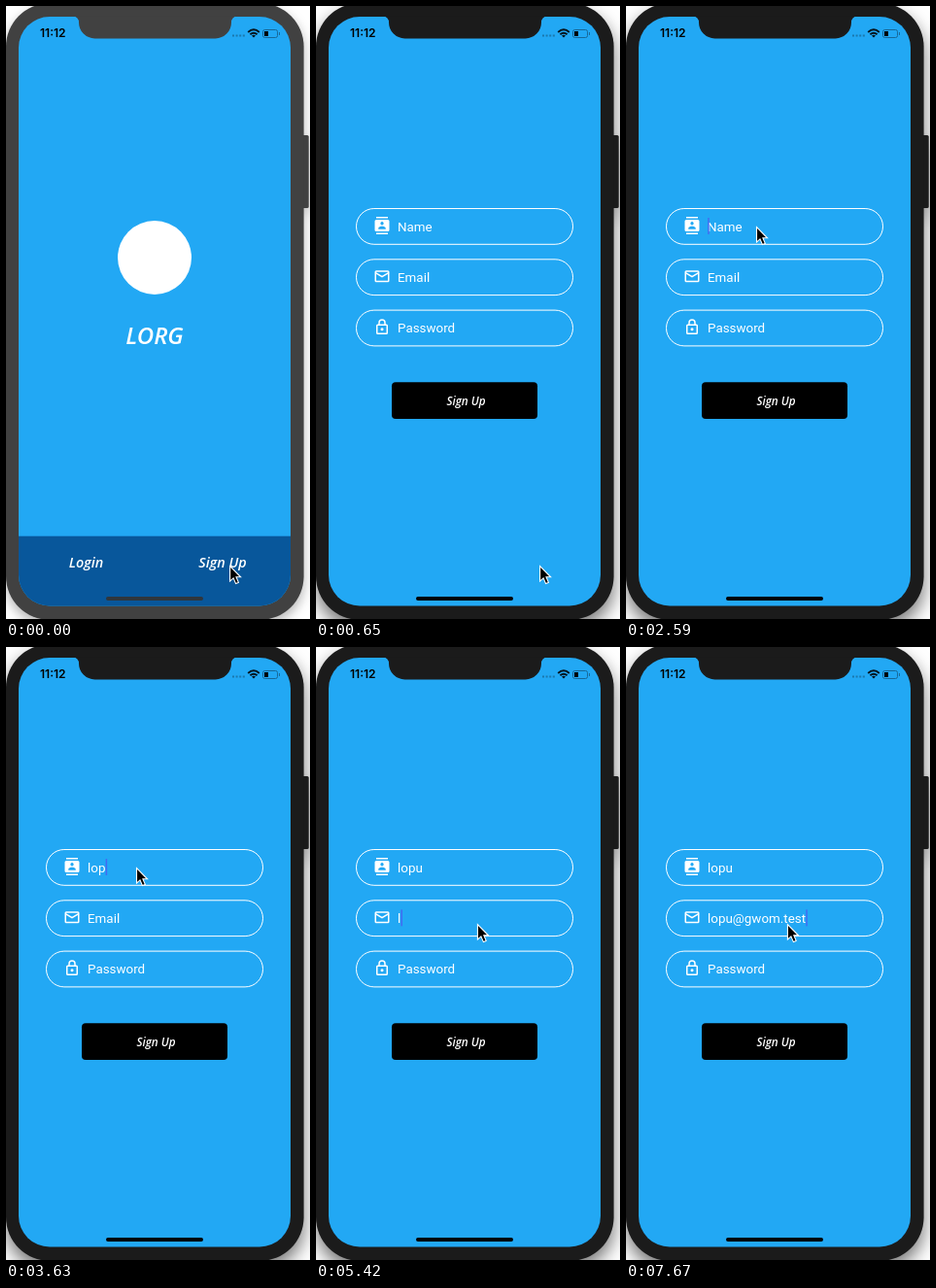
These frames come from a looping animation (313x631 px, 8000 ms). An HTML page:

```html
<!DOCTYPE html>
<html lang="en">
<head>
<meta charset="utf-8">
<title>Sign up</title>
<style>
  html, body { margin: 0; width: 100%; height: 100%; overflow: hidden; background: #fff; }
  svg { display: block; width: 313px; height: 631px; }
  .slant { font: italic 600 14.4px "Open Sans", sans-serif; fill: #fff; text-anchor: middle; }
  .field text { font: 13.4px Roboto, sans-serif; fill: #fff; }
  .clock { font: 600 12px Inter, sans-serif; }
  .pill { fill: none; stroke: #fff; }
  .line { fill: none; stroke: #fff; stroke-width: 2; }
</style>
</head>
<body>
<svg viewBox="0 0 313 631">
  <defs>
    <clipPath id="screen"><rect x="13" y="11" width="280" height="606.5" rx="32"/></clipPath>
    <rect id="pill" class="pill" x="41.5" y="208.5" width="223" height="36.8" rx="18.4"/>
  </defs>
  <g id="body">
    <rect x="300" y="133" width="11.7" height="75" rx="1.5"/>
    <rect x="0" y="-3" width="306.6" height="635" rx="45"/>
  </g>

  <g clip-path="url(#screen)">
    <rect width="313" height="631" fill="#22a8f4"/>
    <g id="welcome">
      <circle cx="153" cy="259" r="38" fill="#fff"/>
      <text class="slant" x="153" y="348" style="font-size:24px">LORG</text>
      <rect y="545.7" width="313" height="80" fill="#08579b"/>
      <text class="slant" x="82.5" y="578">Login</text>
      <text class="slant" x="223" y="578">Sign Up</text>
    </g>

    <g id="form">
      <g class="field">
        <use href="#pill"/>
        <path transform="translate(59 217) scale(.75)" fill="#fff" fill-rule="evenodd" d="M4 0h16v2H4zM4 22h16v2H4zM4 4h16q2 0 2 2v12q0 2-2 2H4q-2 0-2-2V6q0-2 2-2zm8 2.75a2.25 2.25 0 1 0 .01 0zM7 17h10v-1.5c0-1.67-3.33-2.5-5-2.5s-5 .83-5 2.5z"/>
        <text id="name" x="84" y="231.5"></text>
      </g>
      <g class="field">
        <use href="#pill"/>
        <g class="line" transform="translate(59 217) scale(.75)">
          <rect x="3" y="5" width="18" height="14" rx="1"/>
          <path d="M3 7l9 5.5L21 7"/>
        </g>
        <text id="email" x="84" y="231.5"></text>
      </g>
      <g class="field">
        <use href="#pill"/>
        <g class="line" transform="translate(59 217) scale(.75)">
          <rect x="5" y="9" width="14" height="12" rx="1"/>
          <path d="M8 9V6a4 4 0 0 1 8 0v3"/>
          <circle cx="12" cy="15" r="2" fill="#fff" stroke="none"/>
        </g>
        <text x="84" y="231.5">Password</text>
      </g>
      <rect id="caret" width="1.5" height="17" fill="#426bf2"/>
      <rect x="78" y="387.3" width="150" height="37.7" rx="4"/>
      <text class="slant" x="154.5" y="411" style="font-size:11.7px">Sign Up</text>
    </g>
  </g>

  <path id="notch" d="M69 10.5A6 6 0 0 1 75 17A16.4 16.4 0 0 0 91.4 33.4H215.6A16.4 16.4 0 0 0 232 17A6 6 0 0 1 238 10.5Z"/>
  <text class="clock" x="35" y="32">11:12</text>
  <path d="M233 30.5h13" stroke="#1b78ad" stroke-width="2" stroke-dasharray="2 1.6"/>
  <path d="M249.2 27Q255 21.6 260.8 27M251.4 29.3Q255 26 258.6 29.3" fill="none" stroke="#06141d" stroke-width="1.9"/>
  <path d="M253 30.5L255 32.6 257 30.5Q255 28.8 253 30.5Z" fill="#06141d"/>
  <rect x="264.5" y="24.5" width="15" height="8" rx="2" fill="none" stroke="#17699a"/>
  <path d="M266 26h4v5h-4z"/>
  <path d="M281.5 27v3" stroke="#17699a"/>
  <rect id="home" x="103" y="608" width="100" height="4" rx="2"/>
  <path id="cursor" d="M0 0V15.5L3.5 12.3 6 18 8.8 16.8 6.4 11.2H11Z" stroke="#fff" stroke-width="1.1"/>
</svg>
<script>
const $ = id => document.getElementById(id);
const LOOP = 8000, BEAT = 149.2, FORM_START = 638, FIELD_PITCH = 52.3;
const USER = "lopu", HOST = "gwom.test";

document.querySelectorAll(".field").forEach((field, i) =>
  field.setAttribute("transform", `translate(0 ${i * FIELD_PITCH})`));

const show = (id, on) => $(id).setAttribute("display", on ? "inline" : "none");
const within = (beat, from, to) => beat >= from && beat < to;
// Share of a stretch of beats that is done, counting the current beat.
const progress = (beat, start, beats) => Math.min(1, Math.max(0, (beat - start + 1) / beats));
const typed = (text, beat, start, beats) =>
  text.slice(0, Math.round(text.length * progress(beat, start, beats)));

function cursorAt(beat) {
  let x = 230.6, y = 576.6;
  const glide = (start, beats, toX, toY) => {
    const eased = 1 - (1 - progress(beat, start, beats)) ** 2;
    x += (toX - x) * eased;
    y += (toY - y) * eased;
  };
  glide(2, 4, 134.5, 207);
  glide(9, 2, 134.5, 227.6);
  glide(23, 2, 167.3, 292.6);
  glide(25, 1, 166.4, 285.6);
  return `translate(${x} ${y})`;
}

function fill(id, text, placeholder, row, focused) {
  const label = $(id);
  label.textContent = text || placeholder;
  if (!focused) return;
  $("caret").setAttribute("x", 84.2 + (text ? label.getComputedTextLength() : 0));
  $("caret").setAttribute("y", 218 + row * FIELD_PITCH);
}

function draw(now) {
  const beat = Math.floor((now % LOOP - FORM_START) / BEAT);
  const active = beat >= -1, signingUp = beat >= 0;
  const frame = active ? "#1b1b1b" : "#414141";
  $("body").setAttribute("fill", frame);
  $("notch").setAttribute("fill", frame);
  $("body").style.filter = active
    ? "drop-shadow(0 9px 9px rgba(0,0,0,.55))"
    : "drop-shadow(0 5px 6px rgba(0,0,0,.3))";
  $("home").setAttribute("fill", signingUp ? "#000" : "#30363c");
  show("welcome", !signingUp);
  show("form", signingUp);

  const onName = within(beat, 13, 26), onEmail = beat >= 28;
  show("caret", onName || onEmail);
  fill("name", typed(USER, beat, 17, 5), "Name", 0, onName);
  const email = typed(USER, beat, 32, 4) + typed("@", beat, 39, 1) + typed(HOST, beat, 41, 7);
  fill("email", email, "Email", 1, onEmail);

  $("cursor").setAttribute("transform", cursorAt(beat));
  requestAnimationFrame(draw);
}
requestAnimationFrame(draw);
</script>
</body>
</html>
```
